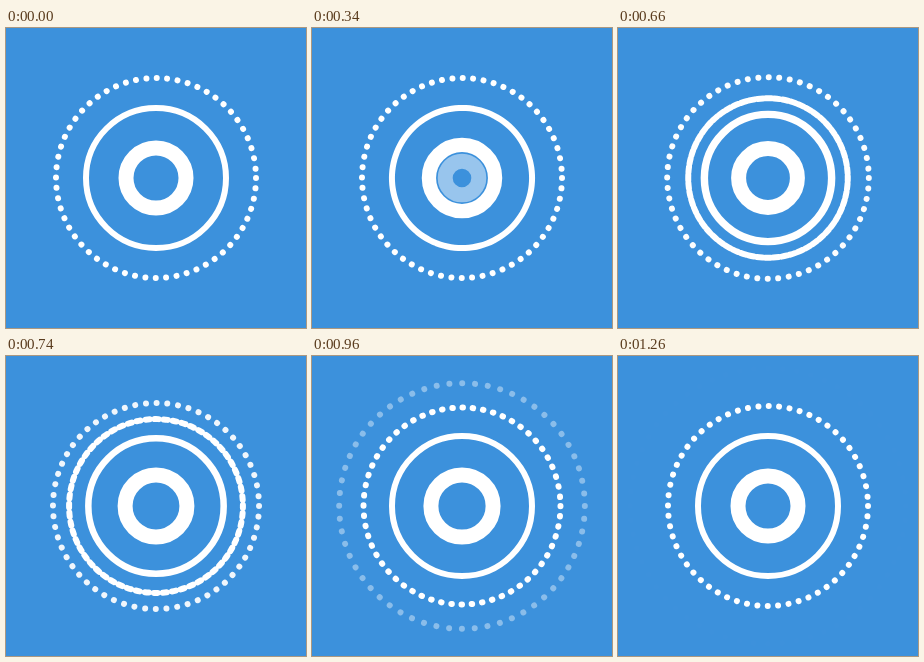
Write an HTML page that moves like this. It is 300 px wide and 300 px high and loops after 1300 ms.

```html
<!DOCTYPE html>
<html lang="en">
<head>
<meta charset="utf-8">
<title>Pulse rings</title>
<style>
  html, body { margin: 0; width: 100%; height: 100%; overflow: hidden; background: #3c91dc; }
  svg { display: block; width: 100%; height: 100%; }
  circle { fill: none; stroke: #fff; }
</style>
</head>
<body>
<svg viewBox="0 0 300 300">
  <circle id="dots" cx="150" cy="150" stroke-linecap="round"/>
  <circle id="split" cx="150" cy="150" stroke-linecap="round"/>
  <circle id="grow" cx="150" cy="150"/>
  <circle id="birth" cx="150" cy="150"/>
</svg>
<script>
const LOOP = 1300, STEP = 20, COUNT = 60;
const [dots, split, grow, birth] =
  ["dots", "split", "grow", "birth"].map(id => document.getElementById(id));

// time, radius, opacity of the new centre ring
const birthKeys = [
  [180, 8.5, 0], [340, 16.8, 0.47], [500, 24.2, 0.82], [660, 29.4, 1],
  [820, 31.7, 1], [960, 31.1, 1], [1100, 30.3, 1], [1260, 30, 1], [1300, 30, 1]
];

const clamp = x => Math.min(1, Math.max(0, x));
const mix = (a, b, p) => a + (b - a) * p;
const inOut = u => u < 0.5 ? 4 * u ** 3 : 1 - 4 * (1 - u) ** 3;
const phase = (t, start, length) => inOut(clamp((t - start) / length));

// Smooth curve through the keys, using neighbouring keys for the slopes
function spline(keys, t, col) {
  const last = keys.length - 1;
  if (t <= keys[0][0]) return keys[0][col];
  if (t >= keys[last][0]) return keys[last][col];
  const i = keys.findIndex(k => k[0] > t) - 1;
  const slope = n => {
    const a = keys[Math.max(0, n - 1)], b = keys[Math.min(last, n + 1)];
    return (b[col] - a[col]) / (b[0] - a[0]);
  };
  const a = keys[i], b = keys[i + 1], h = b[0] - a[0], u = (t - a[0]) / h;
  const v = 1 - u;
  return a[col] * (1 + 2 * u) * v * v + b[col] * u * u * (3 - 2 * u)
    + h * u * v * (slope(i) * v - slope(i + 1) * u);
}

function ring(el, r, width, opacity = 1) {
  el.setAttribute("r", r);
  el.setAttribute("stroke-width", width);
  el.setAttribute("stroke-opacity", opacity);
}

// fill = share of each period covered by a dash, centred on its slot
function dash(el, r, fill) {
  if (fill > 0.999) return el.removeAttribute("stroke-dasharray");
  const period = 2 * Math.PI * r / COUNT;
  const length = Math.max(0.01, fill * period);
  el.setAttribute("stroke-dasharray", `${length} ${period - length}`);
  el.setAttribute("stroke-dashoffset", length / 2);
}

function draw(t) {
  const out = phase(t, 515, 830);
  const outR = mix(100, 138, out);
  ring(dots, outR, 6, 1 - out);
  dash(dots, outR, 0);

  const mid = phase(t, 270, 900);
  const midR = mix(70, 100, mid);
  ring(split, midR, 6);
  dash(split, midR, 1 - mid);

  const p = phase(t, 120, 820);
  ring(grow, mix(30, 70, p), mix(15, 6, p));

  ring(birth, spline(birthKeys, t, 1), 15, clamp(spline(birthKeys, t, 2)));
}

const begin = performance.now();
function tick() {
  const t = (performance.now() - begin) % LOOP;
  draw(Math.floor(t / STEP) * STEP);
  requestAnimationFrame(tick);
}
tick();
</script>
</body>
</html>
```
